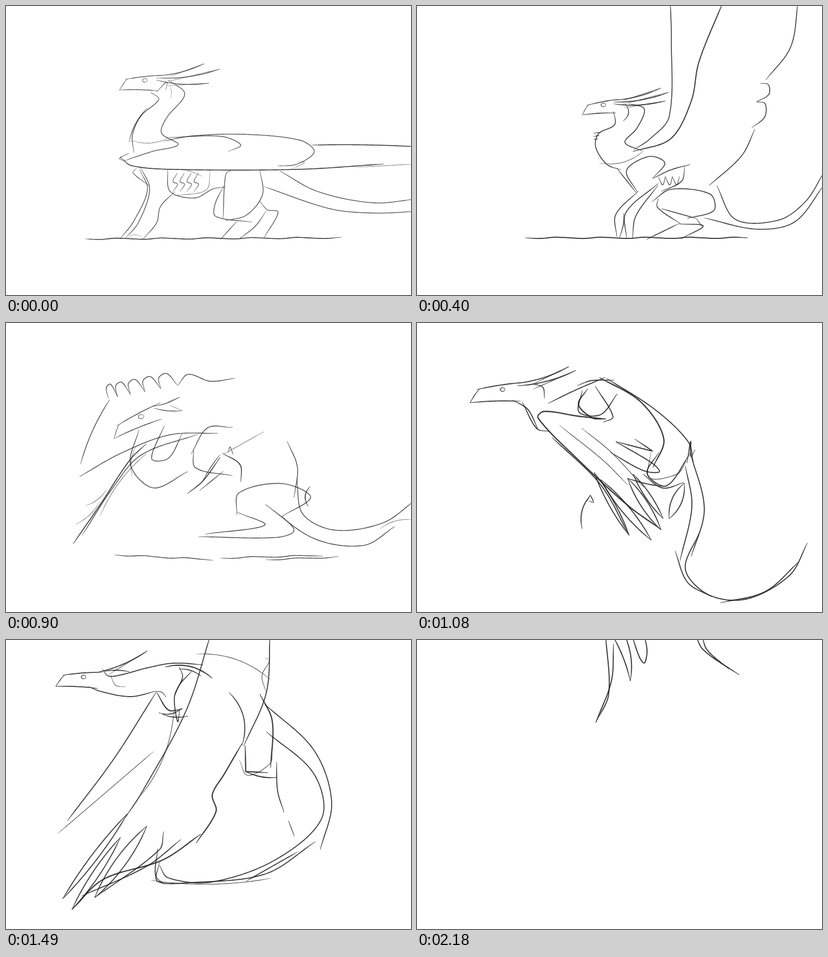
Write an HTML page with a canvas that moves like this. It is 750 px wide and 536 px high and loops after 2.28 s.

```html
<!DOCTYPE html>
<html lang="en">
<head>
<meta charset="utf-8">
<title>Dragon take-off</title>
<style>
html, body { margin: 0; width: 100%; height: 100%; overflow: hidden; background: #fff; }
canvas { display: block; }
</style>
</head>
<body>
<canvas id="stage" width="750" height="536"></canvas>
<script>
const ctx = document.getElementById('stage').getContext('2d');
const LOOP = 2280;
const BEATS = [0, 400, 710, 1080, 1490, 1880, 2180];
const INK = [1.3, 1.6, 1.4, 1.9, 1.8, 2.2, 2];
const tracks = {};

// ---- strokes
const pen = (...c) => ({ w: 1, pts: Array.from({ length: c.length / 2 }, (_, i) => [c[2 * i], c[2 * i + 1]]) });
const faint = s => ({ ...s, w: 0.65 });
const bold = s => ({ ...s, w: 1.25 });
const times = (n, f) => Array.from({ length: n }, (_, i) => f(i));

// Line bulging to its left-hand side by a share of its length.
function arc(x, y, x2, y2, bow = 0) {
  const dx = x2 - x, dy = y2 - y;
  return pen(...times(9, i => {
    const s = i / 8, b = 4 * s * (1 - s) * bow;
    return [x + dx * s + dy * b, y + dy * s - dx * b];
  }).flat());
}

const quill = (x, y, tx, ty, bow) => [arc(x, y, tx, ty, bow), arc(x, y, tx, ty, -bow)];

// Row of rounded feather ends, each longer than the last.
function scallops(n, size, x, y, x2, y2) {
  const dx = x2 - x, dy = y2 - y, len = Math.hypot(dx, dy);
  const at = (s, out) => [x + dx * s + dy / len * out, y + dy * s - dx / len * out];
  return times(n, i => {
    const a = (i / n) ** 1.25, b = ((i + 1) / n) ** 1.25;
    return pen(...at(a, 0), ...at(a, size * 0.8), ...at((a + b) / 2, size), ...at(b, 0));
  });
}

// Beak, skull and eye from the beak tip, then a crest spike to each tip.
function head(x, y, len, high, tilt, ...tips) {
  const c = Math.cos(tilt), s = Math.sin(tilt);
  const at = (u, v) => [x + u * len * c + v * high * s, y + u * len * s - v * high * c];
  const spikes = pen(...tips).pts.map((tip, i) => [
    arc(...at(0.95, 1.4 - i * 0.2), ...tip, -0.05),
    faint(arc(...at(1.25, 1.3 - i * 0.4), ...tip))]);
  const [ex, ey] = at(0.65, 0.95);
  const eye = times(10, i => [ex + 4.5 * Math.cos(i * 0.7), ey + 3.5 * Math.sin(i * 0.7)]);
  return [pen(...at(0.2, 1.05), ...at(0.12, 0.7), ...at(0, 0)), arc(...at(0, 0), ...at(1, 0), 0.02),
    arc(...at(0.14, 1), ...at(1.1, 1.45), 0.02), pen(...eye.flat()), ...spikes.flat()];
}

function ground(x, y, x2, y2) {
  const n = Math.ceil((x2 - x) / 28);
  return pen(...times(n + 1, i => [x + (x2 - x) * i / n, y + (y2 - y) * i / n + 1.3 * Math.sin(i * 2.1)]).flat());
}

// A key: the look of a part at a beat, hung on two joints.
function key(part, beat, joints, ...strokes) {
  (tracks[part] = tracks[part] || []).push({ beat, joints, strokes: strokes.flat(), ink: INK[Math.floor(beat)] });
}

// ---- ground
key('ground', 0, null, bold(ground(147,432, 621,430)));
key('ground', 1, null, bold(ground(201,430, 613,430)));
key('ground', 2, null, ground(201,430, 383,439), ground(397,436, 587,431), ground(481,439, 616,434));
key('ground', 3, null);

// ---- head and neck
key('head', 0, [210,155, 275,255],
  head(210,156, 72,20, 0.02, 367,107, 396,117, 376,143),
  pen(279,159, 298,141, 296,156),
  pen(268,160, 283,173, 250,204, 234,240, 237,272),
  pen(300,137, 331,163, 297,208, 288,236, 319,257, 270,270, 219,287),
  arc(262,189, 228,253, -0.08),
  faint(arc(234,250, 300,245, -0.1)),
  faint(arc(303,148, 305,171, 0.1)));
key('head', 1, [306,202, 390,285],
  head(306,202, 62,17, -0.06, 452,152, 466,160, 460,176),
  pen(364,195, 366,220, 336,237, 331,262, 352,294, 378,304),
  pen(393,181, 421,191, 407,227, 385,253, 418,269),
  arc(386,182, 382,213, 0.25),
  faint(arc(338,291, 418,270, -0.12)),
  times(3, i => arc(327,236 + 6 * i, 341 - 3 * i,234 + 6 * i)));
key('head', 2, [302,281, 395,345],
  head(302,281, 82,17, -0.18, 418,238, 418,260),
  pen(344,275, 319,328, 347,371, 406,357),
  pen(385,277, 354,325, 380,330, 410,296),
  faint(arc(334,300, 318,346, -0.1)));
key('head', 3, [98,148, 245,175],
  head(98,148, 94,24, -0.03, 281,81, 294,88),
  pen(213,113, 233,119, 236,140),
  pen(243,149, 290,126, 348,101),
  pen(177,143, 205,160, 224,197),
  pen(195,147, 222,196, 245,201));
key('head', 4, [90,80, 285,75],
  head(92,86, 78,21, 0.05, 262,20),
  pen(178,54, 190,67, 216,64, 260,52, 310,43, 365,46),
  pen(152,86, 174,95, 230,105, 278,95),
  faint(pen(193,64, 203,84, 221,87)),
  arc(182,58, 229,59, 0.05));
key('head', 5, [150,-260, 320,-250]);

// ---- torso
key('body', 0, [280,300, 450,320],
  pen(242,301, 235,309, 266,334),
  pen(299,303, 304,344, 350,356, 384,339, 407,336),
  faint(pen(378,303, 371,341, 311,352)),
  faint(arc(324,303, 363,316, 0.05)),
  times(4, i => pen(317 + 13 * i,310, 309 + 13 * i,326, 318 + 13 * i,330, 309 + 13 * i,344)));
key('body', 1, [410,300, 545,345],
  pen(408,345, 388,305, 430,279, 459,291, 437,319),
  arc(370,301, 406,346),
  pen(436,320, 470,304, 506,294),
  pen(496,298, 490,325, 452,344),
  times(3, i => pen(447 + 13 * i,317, 455 + 13 * i,332, 460 + 13 * i,316)));
key('body', 2, [425,320, 550,350],
  pen(405,337, 422,297, 457,291),
  pen(407,329, 414,355, 467,358),
  faint(arc(450,330, 501,290)),
  bold(pen(448,329, 475,341, 480,365)),
  pen(535,298, 555,332, 557,375));
key('body', 3, [320,130, 500,240],
  pen(297,116, 322,107, 365,106),
  bold(pen(338,101, 415,147, 457,215, 437,268)),
  pen(350,102, 440,160, 502,220, 512,259));
key('body', 4, [320,80, 490,130],
  bold(arc(295,50, 382,71, 0.13)),
  pen(278,95, 289,97, 296,106),
  faint(arc(352,26, 489,73, 0.1)),
  arc(413,97, 437,196, 0.15),
  bold(pen(437,192, 404,249, 382,287, 389,318, 352,377)),
  faint(pen(480,33, 488,38, 474,66, 482,98)));
key('body', 5, [330,-230, 490,-20]);

// ---- wing
const raised = [
  bold(pen(155,-4, 240,45, 345,103, 382,135)),
  pen(175,14, 280,70, 357,126, 411,243),
  faint(arc(220,49, 362,138, 0.06)),
  pen(300,-2, 357,82, 405,183, 417,286),
  faint(arc(197,-2, 250,46, -0.08)),
  faint(arc(239,16, 278,58, -0.1)),
  arc(327,-2, 470,49, 0.04),
  scallops(5, 30, 472,46, 512,192),
  pen(512,192, 538,212, 527,261, 538,314)].flat();

key('wing', 0, [300,260, 750,280],
  bold(pen(211,280, 232,296, 310,303, 540,303, 700,293)),
  faint(arc(650,299, 760,293)),
  pen(290,251, 345,241, 440,238, 545,249, 571,270, 540,293, 503,297),
  bold(arc(566,258, 760,261, 0.01)),
  pen(300,244, 400,242, 435,258, 411,270),
  faint(pen(540,288, 553,290, 528,303)),
  pen(228,273, 210,283, 222,288));
key('wing', 1, [440,260, 530,-80],
  pen(469,-10, 471,60, 467,205, 432,246, 401,267),
  bold(pen(567,-8, 522,104, 508,176, 470,246, 400,270)),
  pen(706,-10, 692,76, 646,137),
  scallops(2, 20, 635,143, 620,226),
  pen(626,228, 601,278, 541,333));
key('wing', 2, [420,260, 200,-60], raised);
key('wing', 3, [320,140, 440,395],
  bold(pen(350,178, 300,173, 235,164, 224,176, 300,255, 390,338, 452,383)),
  pen(250,212, 340,300, 393,394),
  faint(pen(264,190, 345,255, 390,300)),
  faint(pen(305,195, 360,240, 420,305)),
  quill(328,277, 393,394, 0.04),
  quill(340,290, 434,403, 0.05),
  quill(390,288, 452,384, 0.06),
  quill(400,280, 456,363, 0.05),
  pen(358,240, 420,274, 449,276, 437,261, 368,220),
  pen(368,220, 437,238, 437,238, 403,215),
  arc(390,288, 455,303, -0.03));
key('wing', 3.5, [325,110, 165,-120], raised);
key('wing', 4, [330,110, 122,500],
  pen(379,-10, 334,130, 252,282, 222,328),
  pen(278,97, 200,220, 114,335),
  faint(arc(273,207, 96,359)),
  faint(arc(311,128, 250,288, 0.08)),
  pen(489,-10, 482,98, 440,197),
  quill(225,322, 105,480, 0.03),
  quill(212,366, 122,500, 0.04),
  quill(261,345, 164,478, 0.06),
  pen(292,355, 284,389, 164,478),
  pen(324,370, 260,420, 140,475),
  bold(pen(361,360, 290,408, 180,444, 122,500)));
key('wing', 5, [330,-150, 152,10],
  pen(148,-12, 180,18, 245,16, 315,-12));
key('wing', 6, [420,-220, 350,150],
  pen(349,-12, 355,100, 331,153),
  pen(364,7, 360,76, 331,153),
  arc(361,-10, 395,76, 0.04),
  arc(383,-12, 395,76, 0.08),
  pen(397,-12, 412,32, 421,43, 426,20, 420,-12));

// ---- fore leg
key('fore', 0, [275,300, 235,432],
  pen(247,303, 262,340, 236,400, 211,432),
  pen(249,299, 266,340, 245,402, 221,431),
  pen(313,344, 286,372, 279,402, 254,432),
  faint(arc(225,431, 251,428, 0.2)));
key('fore', 1, [415,310, 385,431],
  pen(410,343, 368,387, 370,428),
  pen(383,384, 382,406, 375,430),
  pen(447,329, 387,383, 388,431),
  pen(446,333, 405,390, 399,432));
key('fore', 2, [425,335, 390,437],
  arc(450,364, 404,417, -0.03),
  bold(pen(449,370, 405,416, 368,439)),
  arc(452,401, 395,436),
  bold(pen(468,362, 473,350, 478,367)));
key('fore', 3, [320,110, 315,185],
  bold(pen(316,122, 299,151, 325,176, 350,178)),
  pen(306,125, 300,165, 340,170, 371,131),
  pen(330,117, 363,174, 345,184));
key('fore', 4, [325,75, 318,150],
  bold(pen(279,97, 301,130, 327,128)),
  pen(321,50, 327,69, 312,105, 318,152, 322,127),
  arc(283,135, 326,126, -0.15),
  arc(290,138, 337,141, -0.08),
  pen(344,58, 322,82, 313,102),
  arc(320,54, 361,67, 0.1));
key('fore', 5, [330,-230, 320,-150]);

// ---- hind leg
key('hind', 0, [440,310, 450,432],
  pen(418,304, 407,312, 402,394),
  pen(470,303, 475,350, 445,388, 406,398),
  pen(403,334, 387,368, 388,390, 456,401),
  pen(469,361, 484,378, 504,382, 477,431),
  pen(482,380, 462,408, 432,432),
  arc(427,400, 397,433));
key('hind', 1, [500,345, 490,431],
  pen(435,363, 470,340, 543,349, 550,379, 500,394),
  pen(447,357, 445,373, 488,404),
  arc(453,376, 517,394),
  pen(484,404, 530,408, 488,432),
  arc(484,404, 425,433),
  arc(517,394, 529,410));
key('hind', 2, [505,360, 500,435],
  pen(453,404, 455,373, 515,358, 556,376, 517,404),
  pen(453,400, 493,417, 410,432),
  pen(516,403, 534,424, 510,434, 400,436),
  bold(arc(555,361, 553,389, -0.2)));
key('hind', 3, [490,240, 475,362],
  pen(448,240, 426,279, 462,302, 507,240),
  faint(pen(433,240, 430,287, 482,280, 499,256)),
  pen(418,280, 455,306, 494,296),
  quill(467,363, 495,297, 0.13),
  pen(500,260, 507,219, 507,248, 515,235));
key('hind', 4, [465,110, 470,250],
  bold(pen(470,100, 493,150, 490,237)),
  bold(pen(443,196, 444,244, 444,244, 485,246)),
  bold(arc(444,244, 501,255, -0.07)),
  faint(pen(432,222, 447,251, 489,229, 493,200)),
  pen(501,226, 503,280, 515,320),
  arc(523,335, 534,364));
key('hind', 5, [470,-110, 505,40],
  pen(444,-10, 476,31, 520,48),
  arc(500,-5, 516,18));
key('hind', 6, [450,-300, 470,-160]);

// ---- tail
key('tail', 0, [490,315, 860,330],
  pen(507,306, 577,344, 680,365, 760,358),
  pen(478,335, 600,376, 680,384, 760,381));
key('tail', 1, [553,350, 750,325],
  pen(555,333, 590,396, 670,397, 720,362, 755,306),
  pen(532,393, 630,414, 700,400, 755,330));
key('tail', 2, [555,365, 730,310],
  pen(555,350, 587,393, 640,393, 700,350, 728,296),
  pen(531,406, 620,418, 690,393, 718,347),
  faint(arc(700,360, 735,327, 0.1)));
key('tail', 3, [505,245, 722,408],
  pen(506,240, 532,345, 508,433),
  pen(497,265, 509,340, 487,441),
  pen(478,423, 501,481, 546,508),
  pen(522,390, 497,457, 540,504, 610,512, 690,468, 723,408),
  pen(562,519, 645,498, 708,442));
key('tail', 4, [485,125, 285,420],
  pen(479,119, 570,204, 603,300, 582,389),
  pen(482,170, 570,248, 585,330, 500,407, 380,449, 300,441, 284,418),
  pen(573,374, 480,434, 340,450, 280,447, 284,412),
  faint(arc(269,446, 491,442, -0.04)),
  arc(445,447, 540,393),
  pen(281,387, 277,437, 293,453));
key('tail', 5, [497,-20, 435,500],
  pen(496,-40, 507,100, 490,247),
  pen(480,-40, 517,45, 528,130, 490,252),
  bold(pen(490,247, 452,336, 432,435, 436,500)),
  pen(489,255, 444,359, 433,460, 437,486),
  faint(arc(518,174, 490,252)));
key('tail', 6, [500,-420, 560,55],
  pen(514,-14, 530,18, 597,65),
  pen(527,-12, 537,18, 578,54));

const arrow = [arc(306,382, 321,320, 0.13), pen(314,331, 321,319, 321,319, 327,333, 319,330)];

// ---- drawing
// Smooth curve through the points; a doubled point makes a corner.
function smooth(p) {
  const out = [p[0]];
  const gap = (a, b) => Math.hypot(b[0] - a[0], b[1] - a[1]);
  for (let i = 0; i < p.length - 1; i++) {
    const a = p[i], b = p[i + 1], d = gap(a, b);
    if (!d) continue;
    const before = p[i - 1] || a, after = p[i + 2] || b;
    const ka = d / (gap(before, a) + d), kb = d / (gap(b, after) + d);
    const n = Math.ceil(d / 4);
    for (let j = 1; j <= n; j++) {
      const s = j / n, s2 = s * s, s3 = s2 * s;
      out.push([0, 1].map(k =>
        a[k] * (2 * s3 - 3 * s2 + 1) + b[k] * (3 * s2 - 2 * s3) +
        (b[k] - before[k]) * ka * (s3 - 2 * s2 + s) +
        (after[k] - a[k]) * kb * (s3 - s2)));
    }
  }
  return out;
}

// Pencil line: a ribbon thinning toward both ends.
function draw({ w, pts }, ink, place) {
  const line = smooth(place ? pts.map(place) : pts), last = line.length - 1;
  const left = [], right = [];
  line.forEach(([x, y], i) => {
    const a = line[Math.max(0, i - 1)], b = line[Math.min(last, i + 1)];
    const dx = b[0] - a[0], dy = b[1] - a[1], len = Math.hypot(dx, dy) || 1;
    const half = w * ink * (0.45 + 0.55 * Math.min(1, Math.min(i, last - i) / 6)) / 2;
    left.push([x - dy / len * half, y + dx / len * half]);
    right.unshift([x + dy / len * half, y - dx / len * half]);
  });
  ctx.beginPath();
  left.concat(right).forEach(([x, y]) => ctx.lineTo(x, y));
  ctx.globalAlpha = Math.min(0.85, 0.5 + 0.22 * w * ink);
  ctx.fill();
}

function bone([x, y, x2, y2]) {
  return { x, y, len: Math.hypot(x2 - x, y2 - y), dir: Math.atan2(y2 - y, x2 - x) };
}

// Moves a stroke from its own bone to the bone between two keys.
function placer(own, a, b, u) {
  const mix = (m, n) => m + (n - m) * u;
  const diff = b.dir - a.dir, turn = Math.atan2(Math.sin(diff), Math.cos(diff));
  const k = mix(a.len, b.len) / own.len, r = a.dir + turn * u - own.dir;
  const c = Math.cos(r) * k, s = Math.sin(r) * k;
  const ox = mix(a.x, b.x), oy = mix(a.y, b.y);
  return ([x, y]) => [ox + (x - own.x) * c - (y - own.y) * s, oy + (x - own.x) * s + (y - own.y) * c];
}

function render(beat) {
  ctx.globalAlpha = 1;
  ctx.fillStyle = '#fff';
  ctx.fillRect(0, 0, 750, 536);
  ctx.fillStyle = '#1c1c1c';
  for (const keys of Object.values(tracks)) {
    const i = keys.filter(k => k.beat <= beat).length - 1;
    const a = keys[i], b = keys[i + 1] || a;
    const u = b === a ? 0 : (beat - a.beat) / (b.beat - a.beat);
    const shown = u > 0.5 && (b.strokes.length || !b.joints) ? b : a;
    const place = u && a.joints ? placer(bone(shown.joints), bone(a.joints), bone(b.joints), u) : null;
    shown.strokes.forEach(s => draw(s, shown.ink, place));
  }
  if (beat === 3) arrow.forEach(s => draw(s, INK[3]));
}

// Each beat is split into even drawings of about 100 ms, on whole hundredths.
const drawings = BEATS.flatMap((t, i) => {
  const span = (BEATS[i + 1] || LOOP) - t, n = Math.round(span / 100);
  return times(n, j => ({ start: Math.floor((t + span * j / n) / 10) * 10, beat: i + j / n }));
});

let shown = null;
function tick() {
  const now = performance.now() % LOOP;
  const next = drawings.filter(d => d.start <= now).pop();
  if (next !== shown) render((shown = next).beat);
  requestAnimationFrame(tick);
}
tick();
</script>
</body>
</html>
```
